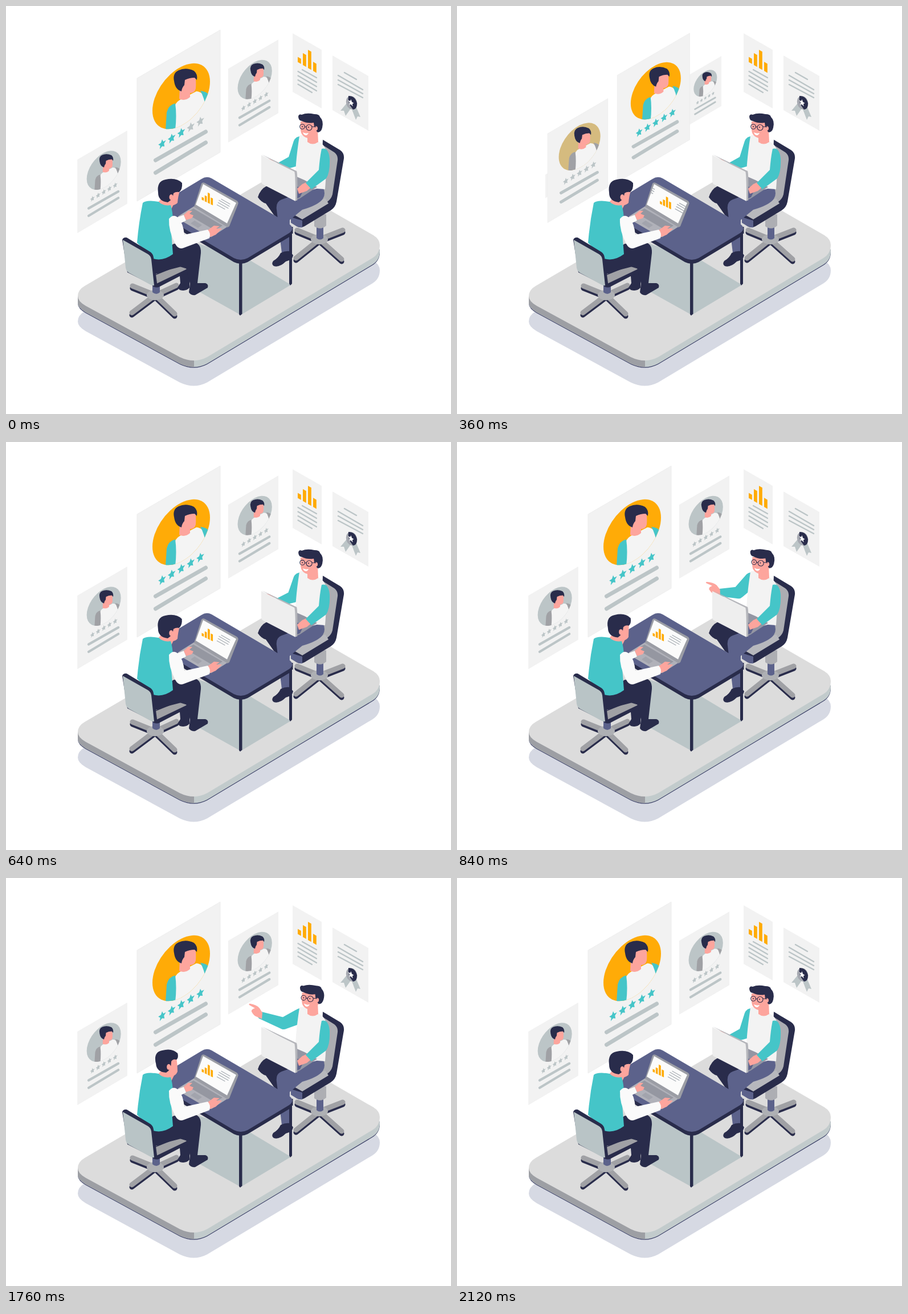
Recreate the animation shown at these times as an HTML page. Size 781x717 px, loop 2.16 s.

```html
<!DOCTYPE html>
<html lang="en">
<head>
<meta charset="utf-8">
<title>Interview</title>
<style>
html, body { margin: 0; width: 100%; height: 100%; overflow: hidden; background: #fff; }
svg { display: block; width: 100vw; height: 100vh; }
</style>
</head>
<body>
<svg id="stage" viewBox="0 0 781 717" xmlns="http://www.w3.org/2000/svg"></svg>
<script>
const NAVY = '#292c4b', BLUE = '#5c628b', TEAL = '#45c5c8', ORANGE = '#ffab07';
const SKIN = '#fda59d', PAPER = '#f2f2f2', MIST = '#bcc5c7', GREY = '#a0a1a5';

const path = (d, fill, extra = '') => `<path d="${d}" fill="${fill}" ${extra}/>`;
const line = (d, color, w, cap = 'round') =>
  `<path d="${d}" fill="none" stroke="${color}" stroke-width="${w}" stroke-linecap="${cap}" stroke-linejoin="round"/>`;

function star(x, y, r, fill, skew = -0.5) {
  let d = '';
  for (let i = 0; i < 10; i++) {
    const a = -Math.PI / 2 + i * Math.PI / 5, q = i % 2 ? r * 0.48 : r;
    d += (i ? 'L' : 'M') + (q * Math.cos(a)).toFixed(2) + ',' + (q * Math.sin(a)).toFixed(2);
  }
  return path(d + 'Z', fill, `class="star" transform="translate(${x} ${y}) matrix(.87 ${skew} 0 1 0 0)"`);
}

function bars(x, y, w, gap, slope, heights) {
  return heights.map((h, i) => {
    const bx = x + i * gap, by = y + i * gap * slope, k = w * slope;
    return path(`M${bx},${by - h}l${w},${k}V${by + k}l${-w},${-k}Z`, ORANGE);
  }).join('');
}

// Candidate sheet, drawn at the size of the middle slot.
const DISC = 'r="1" transform="matrix(50.5 -25.5 0 51.8 307.5 158.500)"';
function poster(id) {
  let s = `<g id="${id}">` + path('M230,127L376,42V257L230,343Z', PAPER, 'stroke="#ebebeb" stroke-width=".8"');
  s += `<circle class="disc" ${DISC}/><g clip-path="url(#disc)">`;
  s += path('M296,176Q299,167 309,163L334,150Q346,150 353,168L360,225H295Z', '#f4f4f4');
  s += path('M282,187Q285,174 297,171Q300,192 297,218H280Z', TEAL, 'class="arm"');
  s += path('M341,149Q354,150 359,160L352,184Q348,160 341,149Z', TEAL, 'class="arm"');
  s += '</g>';
  s += path('M305,143L316,124L332,122Q334,132 333,145Q331,153 323,153L323,160Q314,168 304,163Z', SKIN);
  s += path('M295,132Q292,118 303,113Q316,107 330,114Q337,120 335,130L331,126Q322,126 314,130L313,139Q309,143 308,150Q297,147 295,132Z', NAVY);
  for (let i = 0; i < 5; i++) s += star(274 + i * 16.75, 242.5 - i * 9.9, 8.2, MIST);
  s += line('M262.500,271L350.500,221', MIST, 7) + line('M262.500,293L350.500,240', MIST, 7);
  return s + '</g>';
}

function wheels(cx, cy, ends) {
  const d = ends.map(([x, y]) => `M${cx},${cy}L${x},${y}`).join('');
  return `<g transform="translate(0 4)">${line(d, NAVY, 9)}</g>` + line(d, GREY, 9) +
    `<ellipse cx="${cx}" cy="${cy}" rx="15" ry="9" fill="#aeb0b4"/>`;
}

const SLAB = 'M138,492Q126,499 126,510Q126,519 140,527L305,617Q330,629 353,617L643,443Q656,435 656,420Q656,410 645,403L482,309Q465,300 448,310Z';

function floor() {
  const at = (y, fill) => `<g transform="translate(0 ${y})">${path(SLAB, fill)}</g>`;
  return at(44.5, '#d6d9e3') + at(12.8, '#3a3f66') + at(11.5, '#c2cbcc') +
    path('M126,510V521.500Q127,530.500 140,538.500L305,628.500Q316,634 330,634.500V622L160,520Z', '#9d9fa4') +
    at(0, '#dcdcdc') + path('M338,418L425,445L500,490L412,543L335,500Z', '#bac5c7');
}

function wallSheets() {
  let s = path('M503,48L554,77V180L503,151Z', PAPER) + bars(512, 98.5, 5.8, 9, 0.577, [9, 21, 32, 16]);
  s += line('M520,112L545,126M512.5,115L545,134M512.5,122.500L545,141.500M512.5,130L545,149M512.5,137.500L537,152', MIST, 2.3);
  s += path('M573,87L636,123V219L573,183Z', PAPER);
  s += line('M594,117L615,129M583,122L626,147M583,130L626,154M583,138L626,161', MIST, 2.5);
  s += path('M597,172L587,184L593,184L596,193L606,179L614,200L617,194L622,195L614,176Z', MIST);
  s += '<ellipse cx="606.500" cy="170" rx="9.500" ry="12" fill="#a5a8b0" transform="rotate(-18 606.500 170)"/>';
  s += path('M601,158Q613,158 616,171Q616,182 609,182Q599,170 601,158Z', NAVY);
  return s + star(605.500, 170, 6, '#fff', 0.45);
}

function backMan() {
  let s = wheels(550, 410, [[511, 394], [591, 394], [509, 443], [589, 445]]);
  s += path('M545,386H557V408Q551,413 545,408Z', BLUE);
  s += path('M541,366H562V386Q552,395 541,387Z', '#adaeb3');
  s += path('M556,235L586,253Q594,258 593,268L580,344Q578,354 570,359L524,387Q517,391 510,387L500,380V366L552,330Z', NAVY);
  s += path('M552,242L576,257Q583,262 582,271L573,331Q571,339 564,344L520,371L502,362L550,325Z', '#acadb2');
  s += path('M500,371L520,377V389Q515,390 510,387L500,381Z', BLUE) + path('M502,365L520,375L566,347L560,338Z', '#b7b8bd');
  s += path('M442,336Q446,322 458,316L475,315L512,330L494,347L478,352L479,374L470,367L456,347Q448,345 442,336Z', NAVY);
  s += path('M556,318Q562,330 556,339Q548,350 520,358L498,376L497,436L484,434L475,358Q473,344 484,340L512,330Z', BLUE);
  s += path('M482,434Q490,430 498,431L504,438Q503,446 491,449Q480,460 470,457Q465,454 469,448Q478,443 482,434Z', NAVY);
  s += `<path id="sleeve" fill="${TEAL}"/>`;
  s += `<path id="point" fill="${SKIN}" d="M2,-5L-3,-13Q-8,-19 -20,-21Q-23,-20 -20,-18L-11,-13Q-18,-11 -17,-7Q-13,1 -8,2L1,6Z"/>`;
  s += path('M515,228Q521,225 529,229Q535,242 548,238Q562,244 564,265L560,322Q535,322 508,309Q507,280 515,228Z', '#f3f3f3');
  s += path('M529,225L547,218L548,239Q538,246 529,239Z', SKIN);
  s += '<g id="head">';
  s += path('M517,203Q516,215 518,223Q521,230 529,232Q540,231 546,223L551,214L542,200Z', SKIN);
  s += path('M513,194Q514,189 519,191Q528,187 541,190Q550,190 551,195Q558,202 555,214Q553,222 547,222L545,220Q544,213 541,212L540,205Q529,207 519,202Q513,201 513,194Z', NAVY);
  s += `<ellipse cx="544" cy="215" rx="3" ry="3.800" fill="${SKIN}"/>`;
  s += `<g fill="none" stroke="${NAVY}" stroke-width="1.1"><circle cx="520" cy="212" r="4.300"/><circle cx="532" cy="213.500" r="5"/><path d="M537,212L544,212.500M524,212.500H527"/></g>`;
  s += `<circle cx="520" cy="212" r="1" fill="${NAVY}"/><circle cx="531" cy="213" r="1" fill="${NAVY}"/>`;
  s += path('M521,222Q526,225 531,223Q529,228 525,227Q522,226 521,222Z', '#fff') + '</g>';
  s += path('M508,299L524,306L546,318L516,338L508,342Z', '#9496a3') + path('M511,317L522,324L516,336L511,338Z', BLUE);
  s += path('M511,321L520,313L529,309L535,319L528,325L514,330Z', SKIN);
  s += path('M554,251Q566,248 568,268Q569,292 562,303L536,322L526,311L549,288Q551,264 554,251Z', TEAL);
  s += path('M449,261L510,290Q512,292 511,342L506,342L506,293Z', '#b5b6bb');
  return s + path('M448,262L506,291Q508,292 508,343L450,313Q448,311 448,307Z', '#eeeeee');
}

function slide(x, y) {
  return `<g transform="translate(${x} ${y})">` + bars(343.500, 340.5, 3.700, 5.300, 0.5, [5, 10.500, 18, 12]) +
    line('M378,339.500L393,348M374,341.500L392,352M372.500,345.500L390,355.500M370.500,349.500L384,357', '#a9afb5', 1.4) + '</g>';
}

function desk() {
  const top = 'M343,304Q352,298 361,303L497,383Q508,391 497,399L424,443Q412,449 400,443L255,357Z';
  let s = path('M497,395H502V488L499,491L497,488Z', NAVY) + path('M409,445H414.500V541L411,544L409,542Z', NAVY);
  s += `<g transform="translate(0 7)">${path(top, NAVY)}</g>` + path('M491,388H503.500V400H491Z', NAVY) + path(top, BLUE);
  s += path('M330,352L390,387L362,405Q359,407 355,405L302,374Q300,371 303,369Z', '#b0b1b9');
  s += path('M329,356L380,386L366,394L315,364Z', '#9597a1') + path('M331,377L344,385L337,390L324,382Z', '#a2a4ad');
  s += path('M343,312Q345,309 349,311L405,342Q409,345 407,349L392,387L389,389L330,353Z', '#9b9da5');
  s += path('M346,313L404,346L388,382L333,349Z', '#fbfbfb');
  return s + `<g clip-path="url(#screen)"><g id="slides">${slide(0, 0)}${slide(59, 33)}</g></g>`;
}

function frontMan() {
  let s = wheels(262, 508, [[222, 492], [299, 491], [221, 539], [296, 541]]);
  s += path('M257,487H270V503Q264,509 257,503Z', BLUE);
  s += path('M270,440L312,446L323,456L322,495Q316,502 305,499L301,495L306,487L304,462L262,471L256,446Z', NAVY);
  s += path('M256,474L302,456L318,462V468L268,494L258,491Z', NAVY) + path('M260,474L302,457L318,462L264,488Z', GREY);
  s += path('M258,444L294,418L326,414Q343,416 342,434L336,487L350,487Q356,489 354,495L332,508Q324,509 321,503L323,488L315,456Q290,462 265,470Z', NAVY);
  s += path('M273,338L296,345L290,357Q278,357 267,345Z', SKIN);
  s += path('M240,346Q246,340 268,344Q276,352 289,350Q296,372 290,398L293,436Q276,449 258,444L230,416Q233,380 240,346Z', TEAL);
  s += `<path id="face" fill="${SKIN}"/><path id="hair" fill="${NAVY}"/><ellipse id="ear" rx="3.500" ry="5" fill="${SKIN}"/>`;
  s += path('M299,372L312,367L316,377L306,382Z', '#fafafa') + path('M312,367L320,360L327,360L322,365L329,368L326,373L316,376Z', SKIN);
  s += path('M354,394L365,386L375,387L369,391L379,391L374,396L368,402L358,406Z', SKIN);
  s += path('M286,374Q294,364 303,373Q311,382 313,402L354,393Q360,399 357,408L312,425Q303,429 297,418Q285,395 286,374Z', '#fafafa');
  s += path('M204,411Q206,406 212,407L253,432Q258,435 259,442L265,487L268,494Q260,496 256,490L213,468Z', NAVY);
  return s + path('M205,411L249,436Q254,439 255,445L260,491Q257,492 252,489L216,469Q211,466 210,460Z', '#b9c4c6');
}

const stage = document.getElementById('stage');
stage.innerHTML = `<defs>
  <clipPath id="disc"><circle ${DISC}/></clipPath>
  <clipPath id="screen"><path d="M346,313L404,346L388,382L333,349Z"/></clipPath>
</defs>` + floor() + ['A', 'D', 'B', 'C'].map(poster).join('') + wallSheets() + backMan() + desk() + frontMan();

const $ = id => document.getElementById(id);
const clamp = v => Math.max(0, Math.min(1, v));
const lerp = (a, b, k) => a + (b - a) * k;
const smooth = u => u * u * (3 - 2 * u);
const NUM = /-?[\d.]+/g;

function morph(a, b, k) {
  const n = b.match(NUM);
  let i = 0;
  return a.replace(NUM, v => lerp(+v, +n[i++], k).toFixed(2));
}

function blend(a, b, k) {
  const ch = (c, i) => parseInt(c.substr(i, 2), 16);
  return `rgb(${[1, 3, 5].map(i => Math.round(lerp(ch(a, i), ch(b, i), k)))})`;
}

const LEFT = [169, 309, 0.594], MID = [303, 192.5, 1], RIGHT = [434, 149.5, 0.597];
const gone = slot => [slot[0], slot[1], 0];

function place(id, from, to, k) {
  const [x, y, s] = from.map((v, i) => lerp(v, to[i], k));
  $(id).setAttribute('transform', `translate(${x} ${y}) scale(${s}) translate(-303 -192.5)`);
}

function tint(id, disc, detail, rating) {
  const g = $(id);
  g.querySelector('.disc').setAttribute('fill', blend(MIST, ORANGE, disc));
  g.querySelectorAll('.arm').forEach(e => e.setAttribute('fill', blend(GREY, TEAL, detail)));
  g.querySelectorAll('.star').forEach((e, i) => e.setAttribute('fill', blend(MIST, TEAL, i < rating ? detail : 0)));
}

function limb(a, b, ra, rb) {
  const ang = Math.atan2(b[1] - a[1], b[0] - a[0]), nx = -Math.sin(ang), ny = Math.cos(ang);
  const pt = (p, r) => `${(p[0] + nx * r).toFixed(2)},${(p[1] + ny * r).toFixed(2)}`;
  return `M${pt(a, ra)}A${ra},${ra} 0 0 1 ${pt(a, -ra)}L${pt(b, -rb)}A${rb},${rb} 0 0 1 ${pt(b, rb)}Z`;
}

const polar = (p, deg, r) => {
  const a = deg * Math.PI / 180;
  return [p[0] + r * Math.cos(a), p[1] + r * Math.sin(a)];
};

const HAIR = [
  'M267,328Q264,308 280,305Q299,301 309,311Q310,322 304,327Q298,326 294,329Q293,340 284,345Q267,343 267,328Z',
  'M263,326Q258,306 274,303Q291,298 301,308Q303,316 299,319Q293,317 290,322Q290,337 281,342Q264,341 263,326Z'
];
const FACE = [
  'M282,342L288,326Q297,322 305,325Q302,334 301,346Q296,351 289,350L279,349Z',
  'M278,340L286,322Q293,316 299,316Q301,327 301,340Q298,348 290,348L277,349Z'
];

function draw(t) {
  const u = clamp(t / 560), p = 0.5 * u + 0.25 * (1 - Math.cos(Math.PI * u));
  place('A', LEFT, gone(LEFT), p);
  place('B', MID, LEFT, p);
  place('C', RIGHT, MID, p);
  place('D', gone(RIGHT), RIGHT, p);
  const lit = clamp(t / 320);
  tint('A', 0, 0, 0);
  tint('D', 0, 0, 0);
  tint('B', 1 - clamp((t - 160) / 320), 1 - lit, 3);
  tint('C', lit, lit, 5);

  const q = lerp(p, 1 - Math.pow(1 - u, 2), 0.55);
  $('slides').setAttribute('transform', `translate(${-59 * q} ${-33 * q})`);

  const k = t < 1720 ? smooth(clamp((t - 580) / 500)) : 1 - smooth(clamp((t - 1720) / 400));
  const shoulder = [517, 242];
  const elbow = polar(shoulder, lerp(111.8, 156.6, k), 32.5);
  const bend = lerp(158, 200.6, k);
  const wrist = polar(elbow, bend, lerp(32, 42.7, k * k * k));
  $('sleeve').setAttribute('d', limb(shoulder, elbow, 13, 10.5) + limb(elbow, wrist, 10.5, 6.5));
  $('point').setAttribute('transform', `translate(${wrist}) rotate(${(bend - 200.6) * 0.3})`);
  $('head').setAttribute('transform', `translate(${1.5 * k} ${-0.8 * k}) rotate(${2.2 * k} 538 235)`);

  $('hair').setAttribute('d', morph(HAIR[0], HAIR[1], k));
  $('face').setAttribute('d', morph(FACE[0], FACE[1], k));
  $('ear').setAttribute('cx', lerp(290, 285.5, k));
  $('ear').setAttribute('cy', lerp(336, 332, k));
}

const LOOP = 2160, STEP = 40;
let start;
function tick(now) {
  if (start === undefined) start = now;
  draw(Math.floor(((now - start) % LOOP) / STEP) * STEP);
  requestAnimationFrame(tick);
}
draw(0);
requestAnimationFrame(tick);
</script>
</body>
</html>
```
